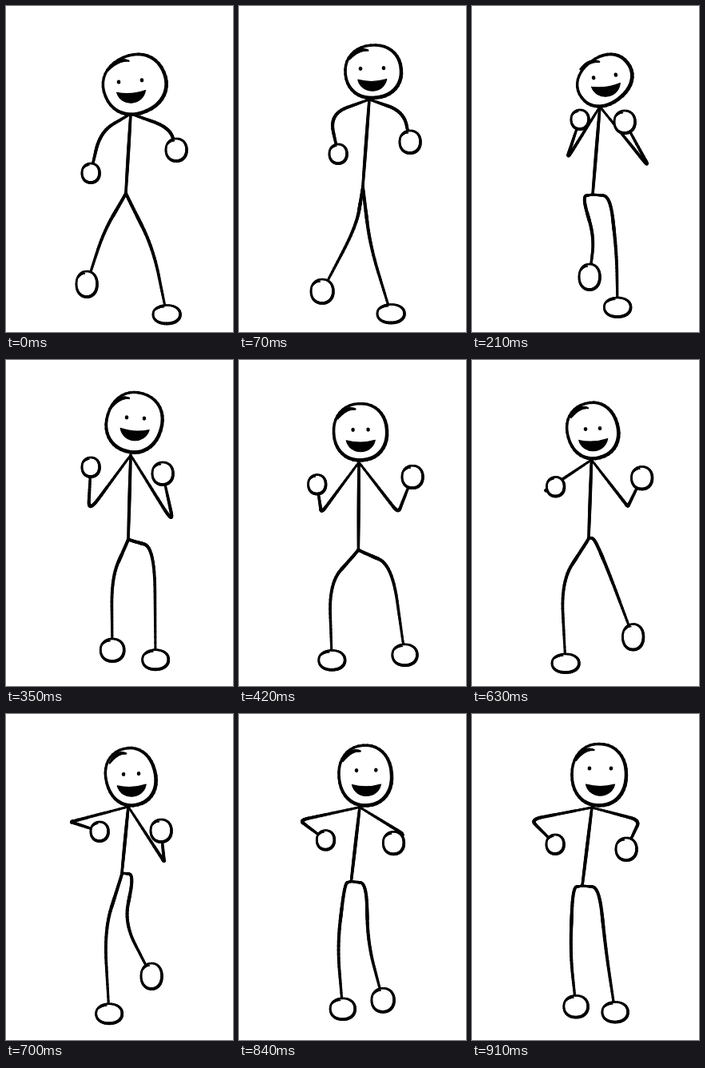
Animation of 284 by 408 pixels, one loop 980 ms. Source, as an HTML page with a canvas:

```html
<!DOCTYPE html>
<html lang="en">
<head>
<meta charset="utf-8">
<title>Dancing stick figure</title>
<style>
  html, body { margin: 0; width: 100%; height: 100%; overflow: hidden; background: #fff; }
  canvas { display: block; width: 284px; height: 408px; }
</style>
</head>
<body>
<canvas id="stage"></canvas>
<script>
const W = 284, H = 408, STEP = 70, STEPS = 14, LEG_SOFTNESS = .4;
const canvas = document.getElementById("stage");
const ctx = canvas.getContext("2d");
const scale = window.devicePixelRatio || 1;
canvas.width = W * scale;
canvas.height = H * scale;
ctx.scale(scale, scale);
ctx.lineCap = ctx.lineJoin = "round";

// head: centre, radii. face: point between the eyes, half eye gap, tilt, drop to the mouth.
// hips: sideways reach of each thigh. Limbs: bend, end. soft: roundness of the elbows.
const stride = {
  head: [161, 98, 39.5, 36.5], face: [155.5, 94, 14.5, -.08, 13],
  neck: [156, 135], hip: [150, 233], hips: [0, 0], soft: [.45],
  armL: [118, 157, 106, 209], armR: [205, 152, 213, 180],
  legL: [122, 283, 101, 348], legR: [184, 303, 201, 386]
};
const rise = {
  head: [168, 82, 35, 33], face: [166.5, 78, 14.5, -.02, 14],
  neck: [163, 117], hip: [155, 225], hips: [0, 0], soft: [.45],
  armL: [113, 135, 124, 185], armR: [206, 132, 214, 170],
  legL: [147, 275, 104, 357], legR: [164, 300, 190, 385]
};
const guard = {
  head: [166, 93, 36, 29], face: [166, 88, 14, -.13, 11],
  neck: [160, 126], hip: [151, 236], hips: [-13, 22], soft: [.2],
  armL: [118, 193, 135, 142], armR: [223, 204, 191, 145],
  legL: [153, 290, 147, 339], legR: [181, 310, 182, 377]
};
const cheer = {
  head: [160.5, 78, 34.5, 37.5], face: [162, 72.5, 11, .06, 14],
  neck: [156, 119], hip: [153, 223], hips: [0, 0], soft: [.25],
  armL: [103, 191, 106, 134], armR: [210, 206, 196, 142],
  legL: [132, 272, 133, 363], legR: [186, 234, 187, 375]
};
const lunge = {
  head: [146, 98, 32.5, 34], face: [145.5, 97, 8.5, -.06, 13],
  neck: [146, 134], hip: [147, 245], hips: [0, 0], soft: [.05],
  armL: [103, 192, 92, 170], armR: [192, 182, 231, 149],
  legL: [100, 284, 105, 384], legR: [195, 271, 221, 365]
};
const kick = {
  head: [156, 78.5, 31, 36], face: [156.5, 75, 9.5, -.05, 14],
  neck: [153, 116], hip: [145, 199], hips: [0, 15], soft: [.05],
  armL: [81, 135, 117, 147], armR: [198, 185, 194, 146],
  legL: [123, 270, 129, 375], legR: [148, 262, 182, 328]
};
const rest = {
  head: [159, 76, 34, 38.5], face: [160.5, 68, 13.5, 0, 20],
  neck: [150, 117], hip: [138, 215], hips: [-12, 21], soft: [.2],
  armL: [73, 132, 104, 163], armR: [210, 133, 193, 169],
  legL: [123, 300, 130, 366], legR: [168, 300, 179, 373]
};

const lerp = (a, b, t) => a.map((v, i) => v + (b[i] - v) * t);
const mix = (a, b, t) => Object.fromEntries(Object.keys(a).map(key => [key, lerp(a[key], b[key], t)]));

// The lunge reaches past its final pose and settles back.
const keys = [
  [0, stride], [1, rise], [3, guard], [5, cheer], [7, mix(cheer, lunge, 1.2)],
  [8, lunge], [10, kick], [13, rest], [STEPS, stride]
];

function poseAt(step) {
  const next = keys.findIndex(([at]) => at > step);
  const [start, from] = keys[next - 1], [end, to] = keys[next];
  return mix(from, to, (step - start) / (end - start));
}

// Strokes the path point(0..1) with a width that varies along it.
function brush(point, width, parts = 40) {
  for (let i = 0; i < parts; i++) {
    ctx.lineWidth = width((i + .5) / parts);
    ctx.beginPath();
    ctx.moveTo(...point(i / parts));
    ctx.lineTo(...point((i + 1) / parts));
    ctx.stroke();
  }
}

const swell = (thin, thick) => u => thin + (thick - thin) * Math.sin(Math.PI * u);
const curve = (a, b, c) => t => lerp(lerp(a, b, t), lerp(b, c, t), t);

// A line through the joints with each inner corner rounded off.
function limb(joints, softness) {
  const last = joints.length - 1;
  const pieces = [];
  let from = joints[0];
  for (let i = 1; i < last; i++) {
    const enter = lerp(joints[i], joints[i - 1], softness);
    const leave = lerp(joints[i], joints[i + 1], softness);
    pieces.push(curve(from, lerp(from, enter, .5), enter), curve(enter, joints[i], leave));
    from = leave;
  }
  pieces.push(curve(from, lerp(from, joints[last], .5), joints[last]));
  const width = swell(2.8, 4.2);
  pieces.forEach((piece, i) => brush(piece, u => width((i + u) / pieces.length), 12));
}

// A slightly squared loop, heaviest at the lower right, with a pen tick at the upper left.
function loop([x, y, rx, ry], tilt, weight, tick) {
  const square = v => Math.sign(v) * Math.abs(v) ** .92;
  const at = (angle, r = 1) => [rx * r * square(Math.cos(angle)), ry * r * square(Math.sin(angle))];
  ctx.save();
  ctx.translate(x, y);
  ctx.rotate(tilt);
  ctx.fillStyle = "#fff";
  ctx.beginPath();
  ctx.ellipse(0, 0, rx, ry, 0, 0, 7);
  ctx.fill();
  brush(u => at(u * 2 * Math.PI), u => weight + .7 * Math.cos(u * 2 * Math.PI - 1));
  ctx.rotate(-tilt);
  brush(curve(at(-2.65, .95), at(-2.1, 1.02), at(-1.78, .82)), swell(tick * .5, tick), 12);
  ctx.restore();
}

function drawFace([x, y, gap, tilt, drop]) {
  const half = 18, depth = 14;
  ctx.save();
  ctx.translate(x, y);
  ctx.rotate(tilt);
  ctx.fillStyle = "#000";
  for (const side of [-1, 1]) {
    ctx.beginPath();
    ctx.ellipse(side * gap, 0, 2.3, 2.6, 0, 0, 7);
    ctx.fill();
  }
  ctx.translate(0, drop);
  ctx.lineWidth = 1.2;
  ctx.beginPath();
  ctx.moveTo(-half, 0);
  ctx.quadraticCurveTo(0, 5, half, 0);
  ctx.bezierCurveTo(half * .75, depth * 1.35, -half * .75, depth * 1.35, -half, 0);
  ctx.fill();
  ctx.stroke();
  ctx.restore();
}

function hand([, , x, y], size) {
  loop([x, y, size, size + 1], 0, 3.2, 2.5);
}

// Feet lie flat on the floor and turn upright when lifted.
function foot([, , x, y]) {
  const lift = Math.min(1, Math.max(0, (380 - y) / 30));
  loop([x, y, 17 - 4 * lift, 11.5 + 4.5 * lift], 0, 3.2, 2.5);
}

function draw(pose) {
  const { head, face, neck, hip, hips, soft } = pose;
  ctx.fillStyle = "#fff";
  ctx.fillRect(0, 0, W, H);
  ctx.strokeStyle = "#000";
  brush(u => lerp(neck, hip, u), swell(3.4, 4.2));
  ["L", "R"].forEach((side, i) => {
    const arm = pose["arm" + side], leg = pose["leg" + side];
    const thigh = [hip[0] + hips[i], hip[1] + 2];
    limb([neck, arm.slice(0, 2), arm.slice(2)], soft[0]);
    limb([hip, thigh, leg.slice(0, 2), leg.slice(2)], LEG_SOFTNESS);
    hand(arm, 11 + 2 * i);
    foot(leg);
  });
  loop(head, face[3] * 5, 4, 4.5);
  drawFace(face);
}

function frame() {
  draw(poseAt(Math.floor(performance.now() / STEP) % STEPS));
  requestAnimationFrame(frame);
}
frame();
</script>
</body>
</html>
```
